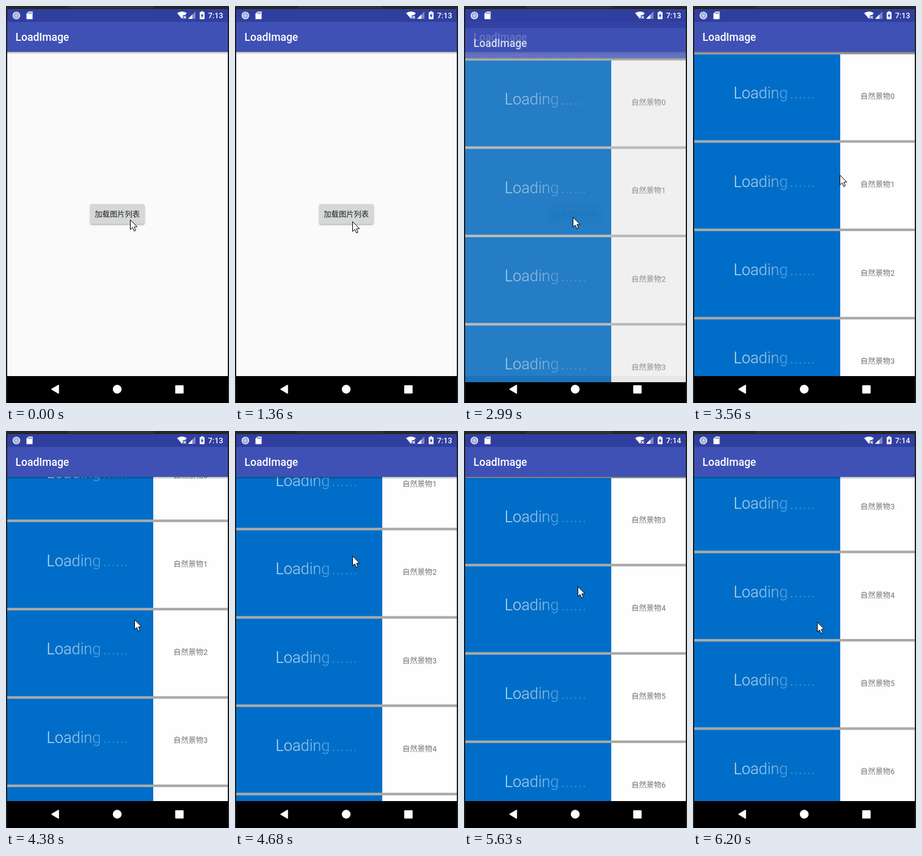
An HTML page with a canvas for the animation above (8 s loop, 365x649 px).

```html
<!DOCTYPE html>
<html lang="zh-CN">
<head>
<meta charset="utf-8">
<title>LoadImage</title>
<style>
html, body { margin: 0; width: 100%; height: 100%; overflow: hidden; background: #1e1e1e; }
canvas { display: block; width: 365px; height: 649px; }
</style>
</head>
<body>
<canvas id="stage" width="365" height="649"></canvas>
<script>
const ctx = document.getElementById('stage').getContext('2d');
const LOOP = 8000;
const SANS = 'Roboto, "Noto Sans CJK SC", "Noto Sans CJK", sans-serif';
const LEFT = 2, RIGHT = 363, BAR_TOP = 5, LIST_TOP = 75, NAV_TOP = 605;
const PITCH = 144.4, GAP = 4.2;

const TICKS = [0, 120, 260, 400, 540, 680, 820, 1090, 1230, 1360, 1500,
  1780, 1920, 2060, 2190, 2330, 2460, 2600,
  2870, 2990, 3130, 3270, 3410, 3560, 3720, 3870,
  3990, 4130, 4270, 4410, 4540, 4680, 4830, 4960,
  5120, 5250, 5390, 5510, 5630, 5780, 5910, 6050, 6200];

const CURSOR = [[0, 204, 349], [400, 188, 346], [820, 206, 354], [1090, 204, 353],
  [1360, 193, 352], [1500, 182, 350], [2190, 179, 345], [2990, 179, 345],
  [3560, 241, 276], [3870, 228, 410], [4680, 193, 204], [4960, 184, 188],
  [5630, 187, 254], [6050, 203, 311], [6200, 204, 312]];
const SCROLL = [[3870, 0], [4130, 30], [4680, 205.6], [4960, 310], [5120, 359],
  [5390, 408], [5630, 435.5], [5910, 453], [6050, 457]];

function sample(keys, t) {
  if (t <= keys[0][0]) return keys[0].slice(1);
  const i = keys.findIndex(k => k[0] > t);
  if (i < 0) return keys[keys.length - 1].slice(1);
  const a = keys[i - 1], b = keys[i];
  const u = (t - a[0]) / (b[0] - a[0]);
  return a.slice(1).map((v, n) => v + (b[n + 1] - v) * u);
}

function box(x, y, w, h, color) {
  ctx.fillStyle = color;
  ctx.fillRect(x, y, w, h);
}

function roundBox(x, y, w, h, r, color) {
  ctx.fillStyle = color;
  ctx.beginPath();
  ctx.roundRect(x, y, w, h, r);
  ctx.fill();
}

function disc(x, y, r, color) {
  ctx.fillStyle = color;
  ctx.beginPath();
  ctx.arc(x, y, r, 0, Math.PI * 2);
  ctx.fill();
}

function poly(points, color) {
  ctx.fillStyle = color;
  ctx.beginPath();
  points.forEach(([x, y]) => ctx.lineTo(x, y));
  ctx.closePath();
  ctx.fill();
}

function text(str, x, y, size, color, weight = 400, align = 'left') {
  ctx.font = `${weight} ${size}px ${SANS}`;
  ctx.textAlign = align;
  ctx.fillStyle = color;
  ctx.fillText(str, x, y);
}

function drawFrame() {
  box(0, 0, 365, 649, '#1e1e1e');
  box(0, 0, 365, BAR_TOP, '#262626');
  box(102, 0, 140, 4, '#323232');
  box(LEFT, BAR_TOP, RIGHT - LEFT, 644, '#000');
}

function drawAppBar() {
  box(LEFT, BAR_TOP, RIGHT - LEFT, 21, '#303f9f');
  box(LEFT, 26, RIGHT - LEFT, 49, '#3f51b5');
  const shade = ctx.createLinearGradient(0, LIST_TOP, 0, LIST_TOP + 4);
  shade.addColorStop(0, 'rgba(0,0,0,.28)');
  shade.addColorStop(1, 'rgba(0,0,0,0)');
  box(LEFT, LIST_TOP, RIGHT - LEFT, 4, shade);
  text('LoadImage', 15.5, 57, 17.5, '#fff', 500);
}

function drawHome(t) {
  box(LEFT, LIST_TOP, RIGHT - LEFT, NAV_TOP - LIST_TOP, '#fafafa');
  drawAppBar();
  ctx.save();
  ctx.shadowColor = 'rgba(0,0,0,.38)';
  ctx.shadowBlur = 2.5;
  ctx.shadowOffsetY = 1;
  roundBox(138, 324, 88.5, 32.5, 2, '#d6d7d7');
  ctx.restore();
  if (t >= 2330) {
    ctx.save();
    ctx.beginPath();
    ctx.roundRect(138, 324, 88.5, 32.5, 2);
    ctx.clip();
    disc(179, 345, 20 + (t - 2330) * 0.15, 'rgba(0,0,0,.055)');
    ctx.restore();
  }
  text('加载图片列表', 182.2, 344.5, 12.3, '#202020', 400, 'center');
}

function drawPlaceholder(y) {
  box(LEFT, y, 239, PITCH - GAP, '#006ec8');
  const fade = ctx.createLinearGradient(68, 0, 200, 0);
  fade.addColorStop(0, 'rgba(255,255,255,.82)');
  fade.addColorStop(0.5, 'rgba(255,255,255,.55)');
  fade.addColorStop(0.6, 'rgba(255,255,255,.35)');
  fade.addColorStop(1, 'rgba(255,255,255,.25)');
  text('Loading', 66.5, y + 72, 25.3, fade, 300);
  for (let i = 0; i < 6; i++) box(160.5 + i * 7.1, y + 70, 1.8, 2, fade);
}

function drawList(scroll) {
  ctx.save();
  ctx.beginPath();
  ctx.rect(LEFT, LIST_TOP, RIGHT - LEFT, NAV_TOP - LIST_TOP);
  ctx.clip();
  box(LEFT, LIST_TOP, RIGHT - LEFT, NAV_TOP - LIST_TOP, '#a9a9a9');
  const first = Math.floor(scroll / PITCH);
  for (let i = first; i < first + 5; i++) {
    const y = LIST_TOP + GAP + i * PITCH - scroll;
    box(241, y, RIGHT - 241, PITCH - GAP, '#fefefe');
    drawPlaceholder(y);
    text('自然景物' + i, 302, y + 72.7, 12.3, '#737373', 400, 'center');
  }
  ctx.restore();
  drawAppBar();
}

function drawStatus(clock) {
  disc(17, 15.5, 6.3, '#d5d9ee');
  disc(17, 15.5, 4.2, '#8e99d0');
  disc(17, 15.5, 2.6, '#c3c9e8');

  poly([[37, 9], [43.5, 9], [43.5, 21.5], [33.5, 21.5], [33.5, 12.5]], '#fff');
  for (let i = 0; i < 3; i++) box(36.5 + i * 2.2, 10.3, 1.1, 2.5, '#303f9f');

  ctx.fillStyle = '#fff';
  ctx.beginPath();
  ctx.moveTo(288, 21);
  ctx.lineTo(280, 11.5);
  ctx.quadraticCurveTo(288, 6.5, 296, 11.5);
  ctx.closePath();
  ctx.fill();
  box(289.5, 15, 7, 7, '#303f9f');
  ctx.strokeStyle = '#fff';
  ctx.lineWidth = 1.2;
  ctx.beginPath();
  ctx.moveTo(290.5, 16.5);
  ctx.lineTo(294.5, 20.5);
  ctx.moveTo(294.5, 16.5);
  ctx.lineTo(290.5, 20.5);
  ctx.stroke();

  poly([[298, 21], [310, 21], [310, 9]], '#7f88c3');
  poly([[298, 21], [305, 21], [305, 14]], '#fff');

  box(319.2, 8.7, 3.6, 2, '#fff');
  roundBox(317, 10, 8, 11.5, 0.8, '#fff');
  poly([[321.6, 11.5], [318.7, 16.4], [320.6, 16.4], [320.4, 20], [323.3, 15], [321.5, 15]], '#303f9f');

  text(clock, 355.5, 20, 12.6, '#fff', 500, 'right');
}

function drawNav() {
  ctx.save();
  ctx.lineJoin = 'round';
  ctx.strokeStyle = '#fff';
  ctx.lineWidth = 1.5;
  poly([[75, 626.5], [86, 620], [86, 633]], '#fff');
  ctx.stroke();
  ctx.restore();
  disc(182, 626.5, 7.2, '#fff');
  roundBox(277, 620, 13.7, 13.5, 1, '#fff');
}

function drawCursor(x, y) {
  ctx.save();
  ctx.translate(Math.round(x) - 0.5, Math.round(y) + 0.5);
  poly([[0, 0], [0, 16], [3.6, 12.7], [6.3, 18.5], [8.8, 17.4], [6.3, 11.7], [11.2, 11.4]], '#fff');
  ctx.strokeStyle = '#000';
  ctx.lineWidth = 1;
  ctx.stroke();
  ctx.restore();
}

function drawScreen(t) {
  ctx.save();
  ctx.beginPath();
  ctx.rect(LEFT, BAR_TOP, RIGHT - LEFT, 644);
  ctx.clip();
  if (t < 3130) drawHome(t);
  if (t >= 2990) {
    const entering = t < 3130;
    ctx.globalAlpha = entering ? 0.8 : 1;
    ctx.translate(0, entering ? 10 : 0);
    drawList(sample(SCROLL, t)[0]);
  }
  ctx.restore();
}

function render(now) {
  const time = now % LOOP;
  const t = TICKS.filter(tick => tick <= time).pop() || 0;
  drawFrame();
  drawScreen(t);
  drawStatus(t < 5120 ? '7:13' : '7:14');
  drawNav();
  drawCursor(...sample(CURSOR, t));
}

const start = performance.now();
function loop() {
  render(performance.now() - start);
  requestAnimationFrame(loop);
}
loop();
</script>
</body>
</html>
```
